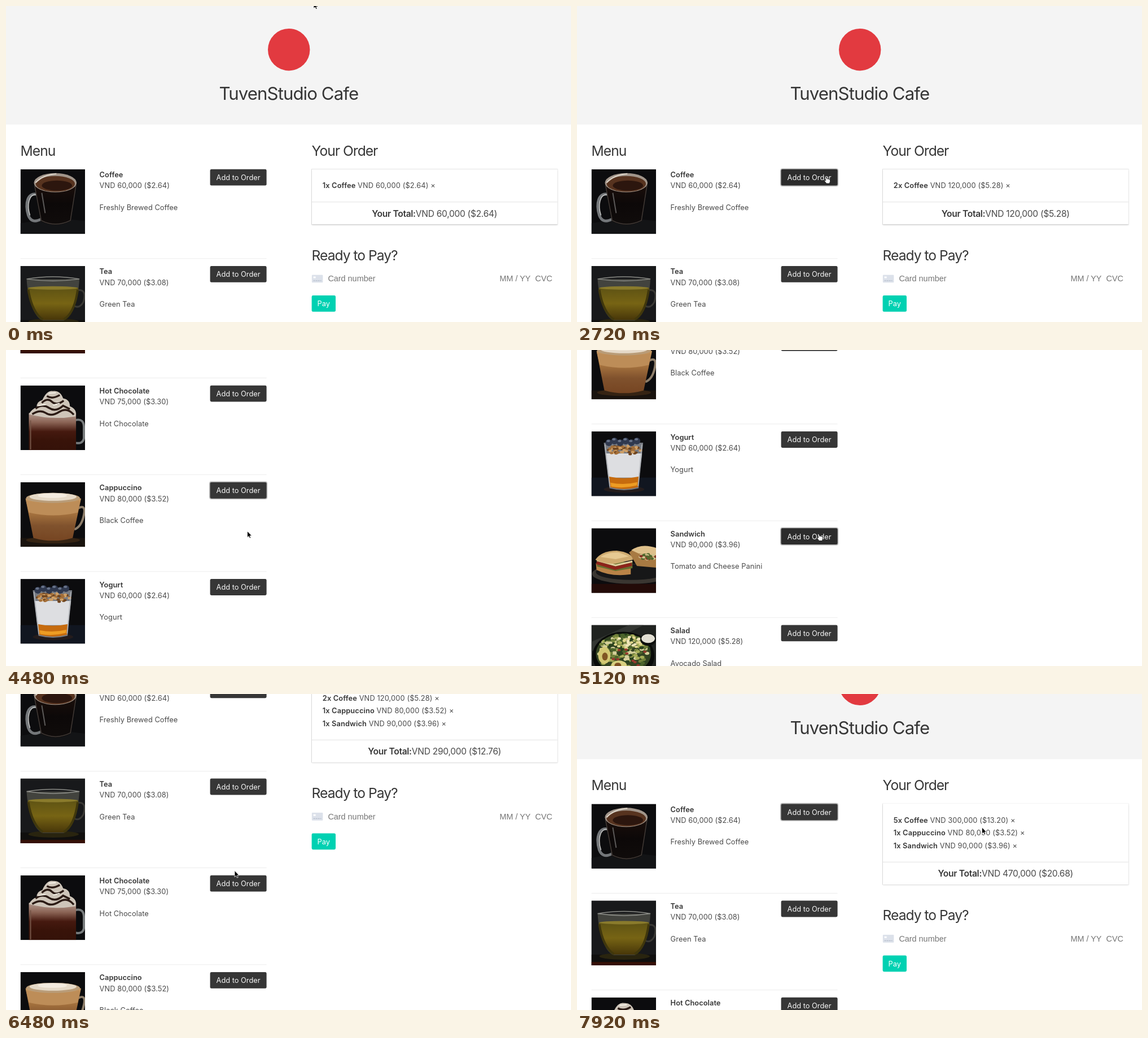
An HTML page that plays this animation: 1001 px wide and 559 px high, repeating every 8000 ms.

```html
<!DOCTYPE html>
<html lang="en">
<head>
<meta charset="utf-8">
<title>Cafe order</title>
<style>
html, body { margin: 0; width: 100%; height: 100%; overflow: hidden; background: #fff; }
body { position: relative; font: 16px/24px Inter, sans-serif; color: #4a4a4a; white-space: nowrap; }
#page { position: absolute; top: 0; left: 0; width: 1252px; height: 1900px; transform-origin: 0 0; }
#page div, #page h1, #page h2, #page svg { position: absolute; }
h1, h2, b { color: #363636; }
h1, h2 { margin: 0; font-weight: 400; letter-spacing: -.04em; }
h1 { left: 0; width: 100%; top: 169px; text-align: center; font-size: 39px; line-height: 48px; letter-spacing: -.03em; }
h2 { font-size: 30.75px; line-height: 38px; }
b { font-weight: 600; }
.hero { width: 100%; height: 262px; background: #f4f4f4; }
.logo { left: 580px; top: 50px; width: 93px; height: 93px; border-radius: 50%; background: #e23a40; }
.item { left: 32px; width: 545px; height: 197px; border-bottom: 1px solid #e8e8e8; }
.item svg { width: 143px; height: 143px; }
.info { left: 175px; letter-spacing: .005em; }
.button { height: 36px; line-height: 36px; border-radius: 3px; text-align: center; color: #f5f5f5; background: #363636; }
.item .button { right: 0; width: 125px; }
.button.hover { background: #2c2c2c; }
.button.focus { box-shadow: 0 0 0 2px #bbb; }
#card { left: 677px; top: 361px; width: 544px; box-shadow: 0 2px 3px rgba(10,10,10,.1), 0 0 0 1px rgba(10,10,10,.1); }
#rows { padding: 24px; letter-spacing: .01em; }
#rows p { margin: 0 0 4px; }
#rows p:last-child { margin: 0; }
#total { border-top: 1px solid #dbdbdb; height: 49px; line-height: 50px; text-align: center; font-size: 19.5px; letter-spacing: -.02em; }
#pay { left: 677px; width: 545px; }
#pay .field { top: 41px; font: 18px/22px "Liberation Sans", Arial, sans-serif; color: #757575; }
#pay .button { top: 89px; width: 53px; background: #00d1b2; color: #fff; }
#cursor { position: absolute; top: 0; left: 0; overflow: visible; }
</style>
</head>
<body>
<div id="page">
  <div class="hero"></div><div class="logo"></div>
  <h1>TuvenStudio Cafe</h1>
  <h2 style="left:32px;top:301px">Menu</h2>
  <h2 style="left:677px;top:301px">Your Order</h2>
  <div id="card"><section id="rows"></section><section id="total"></section></div>
  <div id="pay">
    <h2 style="top:-19px">Ready to Pay?</h2>
    <svg style="top:43px" width="25" height="18" viewBox="0 0 20 14"><rect width="20" height="14" rx="1.5" fill="#dce1ea"/><path d="M3 3h4v3h-4z" fill="#fff"/><path d="M3 10.5h14" stroke="#aab4c4" stroke-dasharray="3 1"/></svg>
    <div class="field" style="left:36px">Card number</div>
    <div class="field" style="left:416px">MM / YY</div>
    <div class="field" style="left:495px">CVC</div>
    <div class="button">Pay</div>
  </div>
</div>
<svg id="cursor" width="1" height="1">
  <path id="arrow" d="M0 0V11.2L2.6 8.9 4.3 12.6 6.2 11.8 4.6 8.2H8Z" stroke="#fff" stroke-width=".8"/>
  <path id="hand" d="M-1 1Q0-1 1.2 1L2.4 4 4 3.6 5.5 4.2 7 4.4 8 6V8.5L6.8 12H1.4L-2 7.4Q-2.2 5.6 .4 6.6Z" fill="#fff" stroke="#222" stroke-width=".9"/>
</svg>
<script>
const $ = id => document.getElementById(id);

// Small drawing helpers for the menu pictures
const shape = (d, fill) => `<path d="${d}" fill="${fill}"/>`;
const line = (d, color, width) => `<path d="${d}" fill="none" stroke="${color}" stroke-width="${width}"/>`;
const oval = (x, y, rx, ry, fill) => `<ellipse cx="${x}" cy="${y}" rx="${rx}" ry="${ry}" fill="${fill}"/>`;
const fade = (id, ...colors) => `<linearGradient id="${id}" x2="0" y2="1">${colors.map((c, i) =>
  `<stop offset="${i / (colors.length - 1)}" stop-color="${c}"/>`).join('')}</linearGradient>`;
let seed = 7;
const random = () => (seed = seed * 16807 % 2147483647) / 2147483647;
const scatter = (count, x, y, rx, ry, size, colors) => Array.from({ length: count }, (_, i) => {
  const angle = random() * 6.28, r = Math.sqrt(random());
  return oval(x + rx * r * Math.cos(angle), y + ry * r * Math.sin(angle), size, size * .7, colors[i % colors.length]);
}).join('');

const pictures = {
  Coffee: fade('coffee', '#1c0f0b', '#0c0808', '#100c0b') +
    shape('M0 96Q60 84 115 92V115H0Z', '#131416') +
    line('M30 45C12 40 8 62 14 82Q20 98 38 88', '#74777a', 5) + line('M28 45C15 44 11 64 17 82', '#c9cac8', 1.5) +
    shape('M24 24L36 92Q62 106 90 92L100 24Z', 'url(#coffee)') +
    line('M25 28L37 91Q62 104 89 91L99 28', '#413a36', 1.5) +
    oval(62, 24, 38, 17, '#a1958a') + oval(62, 26, 35, 14, '#57331f') + oval(65, 29, 27, 9, '#2c160e') +
    line('M27 24Q40 10 64 8', '#ddd5c9', 2) + line('M38 42L44 78', '#5c5a59', 2),
  Tea: fade('tea', '#5d5214', '#776414', '#473609') + shape('M0 0H115V115H0Z', '#18191b') +
    shape('M0 96H115V115H0Z', '#100f0e') + shape('M0 109H115V115H0Z', '#351006') + oval(59, 99, 45, 6, '#29240f') +
    line('M102 43Q119 41 112 64Q105 76 96 71', '#393834', 3) +
    shape('M11 23C13 62 25 92 40 97H77C94 88 103 58 105 23Z', '#42433e') +
    shape('M13 39Q58 35 103 39C99 70 91 91 77 96H40C27 90 16 68 13 39Z', 'url(#tea)') +
    line('M14 42C18 69 28 88 40 95M102 42C98 70 90 88 77 95', '#40370c', 4) +
    oval(58, 39, 44, 3, '#8a7b2c') + line('M11 23Q58 15 105 23Q58 30 11 23', '#8b8c87', 1.5),
  'Hot Chocolate': fade('cocoa', '#b39b90', '#8b6455', '#45190f', '#381309', '#351209') +
    line('M97 62Q114 57 113 77V94Q111 105 97 102', '#777b7c', 4) +
    shape('M15 49H99V115H15Z', 'url(#cocoa)') + shape('M15 51Q20 42 29 39Q28 29 39 26Q47 8 58 10Q71 9 76 23Q88 25 88 37Q102 43 98 55Q55 62 15 51Z', '#cec5b9') +
    line('M47 19Q57 25 70 17M38 31Q48 21 56 29T77 27M27 41Q39 32 51 40T76 36L88 42M21 51Q35 42 45 49T69 47 95 52', '#2b1b15', 3.5) +
    line('M50 14L63 13M31 36L45 34M58 35L70 32', '#f7f3e9', 2) + line('M18 62V114', '#745446', 2),
  Cappuccino: fade('cap', '#cda06a', '#ad7942', '#80522d', '#764522') + shape('M0 99H115V115H0Z', '#19130e') + oval(58, 103, 48, 6, '#352313') +
    line('M103 46Q117 39 113 58Q109 79 96 84', '#8e7e6a', 4) +
    shape('M9 29Q58 19 108 29L93 99Q58 109 23 99Z', 'url(#cap)') + shape('M10 33Q58 43 106 33L102 54Q58 64 15 54Z', '#bd8d58') +
    oval(58, 28, 48, 9, '#b99c78') + oval(58, 26, 42, 7, '#e5d9c8') + oval(57, 24, 26, 4, '#f3ebe0'),
  Yogurt: shape('M0 82H115V115H0Z', '#111620') + oval(58, 103, 36, 6, '#241c1c') +
    shape('M22 20H92L84 101Q58 108 32 101Z', '#777b83') + shape('M25 39H90L85 82H30Z', '#dddee1') +
    shape('M30 80Q58 86 85 80L83 99Q58 106 33 99Z', '#c66b0e') + shape('M34 91Q58 96 82 90L81 96Q58 102 35 98Z', '#ed9c23') +
    scatter(65, 57, 33, 32, 8, 3, ['#a46f39', '#d0a066', '#70451f']) +
    [31, 41, 51, 61, 71, 81].map((x, i) => oval(x, 20 - i % 2 * 3, 6, 6, '#30394f') + oval(x - 1, 17 - i % 2 * 3, 3, 2, '#69748a')).join('') +
    line('M24 23L33 98M90 23L83 97', '#b4b7bb', 1.5),
  Sandwich: oval(71, 81, 70, 18, '#3a3631') + oval(71, 78, 63, 14, '#171718') + shape('M0 99H115V115H0Z', '#230b08') +
    shape('M67 43Q85 27 115 36V70L81 67Z', '#a87a43') + shape('M71 39Q89 26 115 35V48L84 45Z', '#dec08b') + scatter(30, 99, 51, 16, 5, 3, ['#873124', '#d1c28e', '#51692e']) +
    shape('M8 62L70 68 70 82Q35 87 9 74Z', '#b98347') + shape('M9 57L73 61V71L43 76 10 68Z', '#66702f') +
    line('M9 61L42 71 72 64', '#8d241a', 6) + line('M10 57L43 66 73 59', '#e0d0a0', 3) +
    shape('M7 56Q18 40 45 40Q72 43 74 56L43 63Q23 64 7 56Z', '#cfab70') + shape('M16 51Q29 42 48 43L67 50 43 55Z', '#e6c992'),
  Salad: shape('M0 0H115V115H0Z', '#202320') + shape('M0 30L67 0H93L0 47Z', '#333632') +
    oval(57, 55, 55, 43, '#090b09') + oval(57, 51, 49, 36, '#334322') +
    scatter(210, 57, 50, 46, 33, 4, ['#71803a', '#a5ad57', '#4c642b', '#d4cf9a', '#2a421e']) +
    oval(23, 54, 11, 15, '#d3c873') + oval(24, 56, 5, 7, '#805623') + oval(49, 72, 14, 9, '#d7cf7f') + oval(47, 72, 6, 5, '#7d4f22') +
    scatter(24, 65, 32, 25, 13, 3, ['#efe5b8', '#e1d68d']) + scatter(9, 68, 56, 30, 20, 3, ['#96392d']) +
    oval(101, 26, 14, 11, '#0c0e0c') + oval(101, 24, 12, 8, '#e1ded2')
};

const menu = [
  ['Coffee', 60, 'Freshly Brewed Coffee'], ['Tea', 70, 'Green Tea'], ['Hot Chocolate', 75, 'Hot Chocolate'],
  ['Cappuccino', 80, 'Black Coffee'], ['Yogurt', 60, 'Yogurt'], ['Sandwich', 90, 'Tomato and Cheese Panini'],
  ['Salad', 120, 'Avocado Salad']
];
const scale = .8;
const price = k => `VND ${k},000 ($${(k * .044).toFixed(2)})`;
const itemTop = i => 361 + 214 * i;
const buttons = menu.map(([name, cost, text], i) => {
  $('page').insertAdjacentHTML('beforeend', `<div class="item" style="top:${itemTop(i)}px">
    <svg viewBox="0 0 115 115"><rect width="115" height="115" fill="#0c0c0e"/>${pictures[name]}</svg>
    <div class="info"><b>${name}</b><br>${price(cost)}<br><br>${text}</div>
    <div class="button">Add to Order</div></div>`);
  return $('page').lastElementChild.querySelector('.button');
});

// Tracks of [time, value...], in stage pixels
const scrollTrack = [[3520, 0], [3600, 205], [3680, 386], [3760, 450], [3840, 480], [3920, 491], [4400, 491],
  [4480, 568.5], [4560, 682], [4640, 760], [4720, 804], [4880, 829.5], [5920, 829.5], [6080, 710], [6480, 310.4], [6640, 165], [6800, 94.4]];
const cursorTrack = [[0, 545, -7], [480, 272, 124], [1520, 272, 124], [2080, 440.5, 302], [3040, 440.5, 302],
  [3280, 447.5, 364.5], [3680, 447.5, 364.5], [4080, 427.5, 320.5], [4880, 427.5, 320.5], [4960, 427.5, 325.5],
  [5200, 427.5, 325.5], [5280, 427.5, 320.5], [5360, 427.5, 320.5], [5600, 465, 300], [5760, 405, 312.5],
  [6800, 405, 312.5], [7040, 411, 210], [7440, 411, 210], [7600, 640, 229], [7840, 640, 229], [7920, 717.5, 236]];
const focusTrack = [[2400, 0], [4160, 3], [5120, 5], [7040, 0]];
const orders = [[0, 0], [2720, 0], [4240, 3], [5120, 5], [7120, 0], [7280, 0], [7440, 0]];

function sample(track, t) {
  const next = track.findIndex(key => key[0] > t);
  if (next < 1) return track.at(next).slice(1);
  const [from, to] = [track[next - 1], track[next]], p = (t - from[0]) / (to[0] - from[0]);
  return from.slice(1).map((v, i) => v + (to[i + 1] - v) * p);
}

let shown;
function showOrder(t) {
  const added = orders.filter(([time]) => time <= t).map(([, item]) => item);
  if (shown === added.length) return;
  shown = added.length;
  const items = [...new Set(added)];
  $('rows').innerHTML = items.map(item => {
    const count = added.filter(other => other === item).length;
    return `<p><b>${count}x ${menu[item][0]}</b> ${price(count * menu[item][1])} ×</p>`;
  }).join('');
  $('total').innerHTML = `<b>Your Total:</b>${price(added.reduce((sum, item) => sum + menu[item][1], 0))}`;
  $('pay').style.top = 551 + 28 * (items.length - 1) + 'px';
}

function draw(now) {
  const t = Math.floor(now % 8000 / 80) * 80;
  const [scroll] = sample(scrollTrack, t), [x, y] = sample(cursorTrack, t);
  const focus = focusTrack.filter(([time]) => time <= t).at(-1);
  let over = false;
  buttons.forEach((button, i) => {
    const top = itemTop(i) * scale - scroll, hover = x > 361 && x < 462 && y >= top && y < top + 29;
    button.classList.toggle('hover', hover);
    button.classList.toggle('focus', !!focus && focus[1] === i);
    over ||= hover;
  });
  showOrder(t);
  $('page').style.transform = `translateY(${-scroll}px) scale(${scale})`;
  $('cursor').style.transform = `translate(${x}px, ${y}px)`;
  $('arrow').style.display = over ? 'none' : '';
  $('hand').style.display = over ? '' : 'none';
  requestAnimationFrame(draw);
}
requestAnimationFrame(draw);
</script>
</body>
</html>
```
